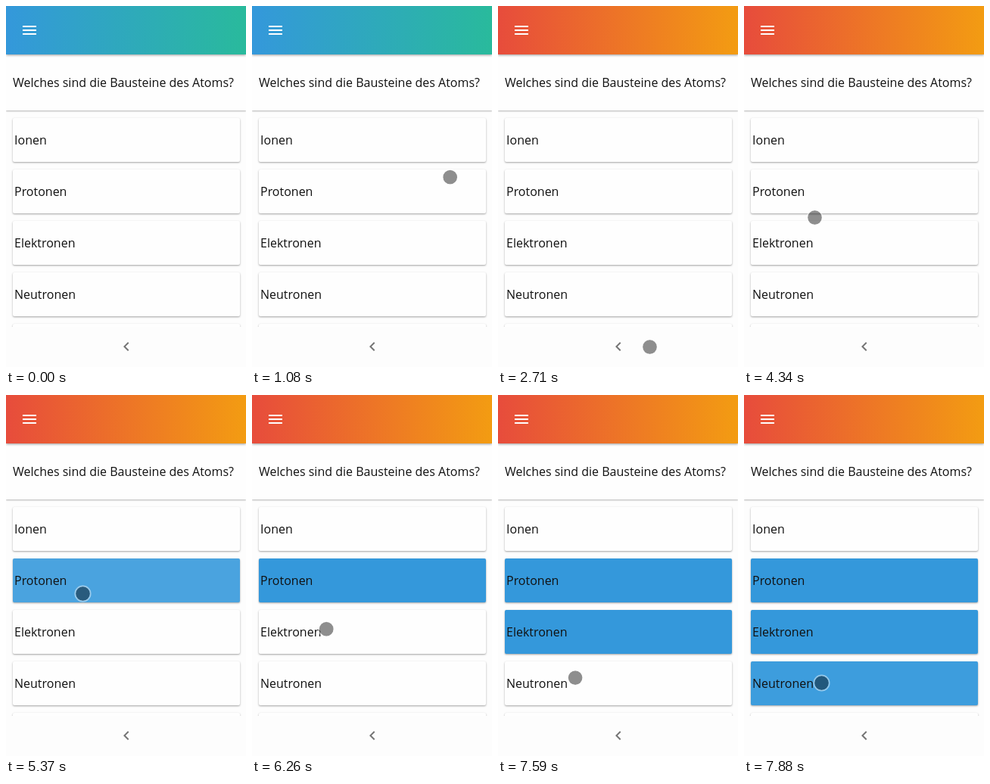
Write an HTML page that moves like this. It is 317 px wide and 477 px high and loops after 8000 ms.

```html
<!DOCTYPE html>
<html lang="de">
<head>
<meta charset="utf-8">
<title>Quiz</title>
<style>
  html, body { margin: 0; width: 100%; height: 100%; overflow: hidden; background: #fff; }
  #stage { position: relative; width: 317px; height: 477px; overflow: hidden; background: #fdfdfd;
    font: 16px "Open Sans", "Noto Sans", sans-serif; color: #111; white-space: nowrap; }
  #stage > *, .card { position: absolute; box-sizing: border-box; }
  header { left: 0; top: 0; width: 317px; height: 64px; z-index: 2; box-shadow: 0 1px 3px rgba(0,0,0,.4); }
  #question { left: 0; top: 64px; width: 317px; height: 74px; line-height: 74px; padding-left: 9px;
    background: #fefefe; box-shadow: 0 1px 2px rgba(0,0,0,.3); }
  #list { left: 0; top: 140px; width: 317px; height: 284px; overflow: hidden; }
  .card { left: 9px; width: 300px; height: 58px; line-height: 58px; padding-left: 2px; border-radius: 2px;
    background: #fefefe; box-shadow: 0 1px 3px rgba(0,0,0,.14), 0 1px 2px rgba(0,0,0,.24); }
  svg { left: 0; top: 0; z-index: 3; }
</style>
</head>
<body>
<div id="stage">
  <header id="bar"></header>
  <div id="question">Welches sind die Bausteine des Atoms?</div>
  <div id="list"></div>
  <svg width="317" height="477">
    <path fill="#fff" d="M22 26h18v2h-18zm0 5h18v2h-18zm0 5h18v2h-18z"/>
    <path fill="#757575" transform="translate(147 438)" d="M15.41 7.41L14 6l-6 6 6 6 1.41-1.41L10.83 12z"/>
    <g id="cursor">
      <circle r="9.4" fill="#000" fill-opacity=".44"/>
      <circle r="10.2" fill="none" stroke="#fff" stroke-opacity=".45" stroke-width="1.7"/>
    </g>
  </svg>
</div>
<script>
const LOOP = 8000, START = 495, STEP = 147.6;
const BLUE = [52, 152, 219], PAPER = 254;
const THEMES = ['#3498db, #29ba9c', '#e74c3c, #f39c12'];
const THEME_STEP = 8;

// Each answer and the step at which it is tapped
const ANSWERS = [['Ionen'], ['Protonen', 33], ['Elektronen', 43], ['Neutronen', 49], ['']];

// Pointer path: step, x, y
const PATH = [
  [0, 303, 164], [7, 198, 322], [8, 194.5, 330.5], [15, 200.5, 450.5],
  [21, 112, 196], [23, 103, 207], [26, 93.5, 279.5], [28, 100.5, 278],
  [29, 100.5, 278], [31, 101.5, 262.5], [34, 101.5, 262.5], [40, 98, 313],
  [41, 98, 313], [42, 98.5, 314], [44, 98.5, 314], [49, 102.5, 380.5]
];

const byId = id => document.getElementById(id);
const bar = byId('bar'), cursor = byId('cursor');
const cards = ANSWERS.map(([label], i) => {
  const card = document.createElement('div');
  card.className = 'card';
  card.textContent = label;
  card.style.top = 8 + 68 * i + 'px';
  byId('list').append(card);
  return card;
});

function pointAt(step) {
  const next = PATH.findIndex(p => p[0] > step);
  if (next < 0) return PATH[PATH.length - 1].slice(1);
  const a = PATH[next - 1], b = PATH[next];
  const u = (step - a[0]) / (b[0] - a[0]);
  const eased = u * u * (3 - 2 * u);
  return [1, 2].map(i => a[i] + (b[i] - a[i]) * eased);
}

function cardColor(step, tapStep) {
  if (!(step >= tapStep)) return '#fefefe';
  const fade = 0.11 * Math.exp(-0.87 * (step - tapStep));
  return `rgb(${BLUE.map(c => Math.round(c + (PAPER - c) * fade))})`;
}

function draw(time) {
  const step = Math.floor((time - START) / STEP);
  bar.style.background = `linear-gradient(90deg, ${THEMES[step < THEME_STEP ? 0 : 1]})`;
  cards.forEach((card, i) => card.style.background = cardColor(step, ANSWERS[i][1]));
  cursor.style.display = step < 0 ? 'none' : '';
  if (step >= 0) cursor.setAttribute('transform', `translate(${pointAt(step)})`);
}

const origin = performance.now();
function tick() {
  draw((performance.now() - origin) % LOOP);
  requestAnimationFrame(tick);
}
tick();
</script>
</body>
</html>
```
